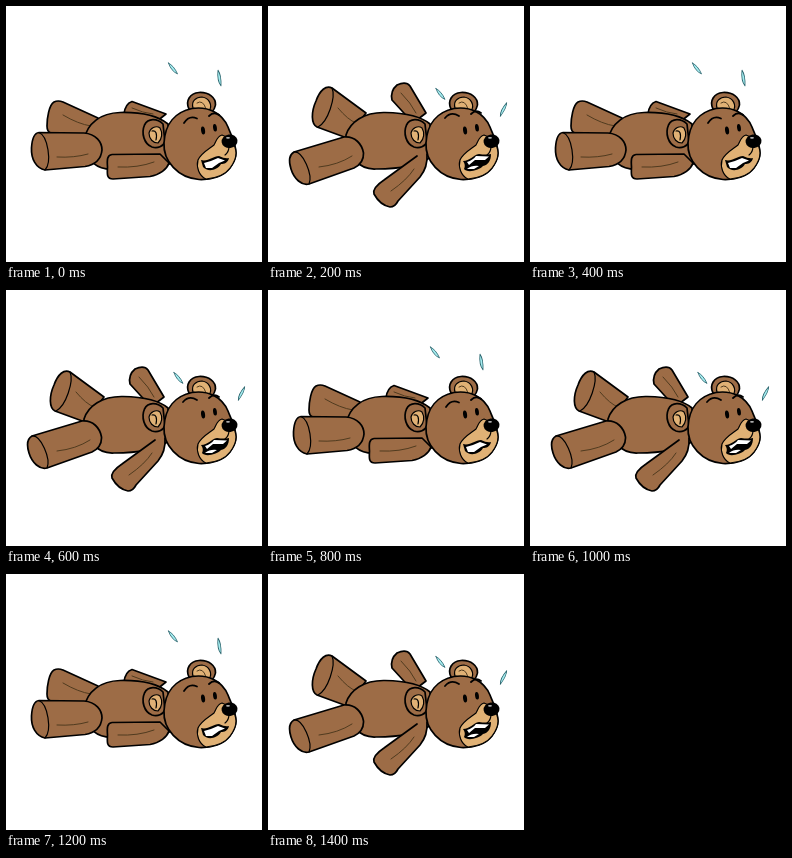
These frames come from a looping animation (256 px wide and 256 px high, 1600 ms). An HTML page:

```html
<!DOCTYPE html>
<html lang="en">
<head>
<meta charset="utf-8">
<title>Swimming bear</title>
<style>
html, body { margin: 0; width: 100%; height: 100%; overflow: hidden; background: #fff; }
svg { display: block; width: 100vw; height: 100vh; }
.fur { fill: #9d6c46; }
.tan { fill: #e0b175; stroke-width: 1.2; }
.ink { fill: #000; stroke: none; }
.teeth { fill: #fff; stroke: none; }
.line { fill: none; stroke-width: 1.2; }
.crease { fill: none; stroke: #503b1f; stroke-width: 1; }
.brow { fill: none; stroke-width: 1.8; }
.drop { fill: #a5edf0; stroke: #245f68; stroke-width: .9; }
</style>
</head>
<body>
<svg viewBox="0 0 256 256" stroke="#000" stroke-width="1.7" stroke-linejoin="round" stroke-linecap="round">
  <defs>
    <g id="head">
      <path class="fur" d="M183 103C179 95 184 87 193 86.500C203 86 210 92 209.500 99C209 103 207 105 205 107Z"/>
      <path class="tan" d="M187 102C185 95 190 91 196 91C203 92 207 99 203 105Z"/>
      <path class="crease" d="M191 97Q197 93 200 103"/>
      <path class="fur" d="M157 118C151 112 142 112 138.500 119C135 127 138 138 146 141C152 143 157 140 159 136Z"/>
      <path class="fur" d="M158 137C159 118 169 106 186 102.500C202 100 216 107 222 121C225 129 230 138 230 147C230 154 227 157 224 162C218 170 206 174 193 173.500C172 172 157 155 158 137Z"/>
      <path class="tan" d="M154 122C150 119 144 122 143 127C143 133 147 137 152 137C156 133 157 127 154 122Z"/>
      <path class="line" d="M146 125Q152 124 150 134"/>
      <path class="tan" d="M216 129C211 130 210 136 208 139C203 143 195 147 192 154C190 161 193 170 200 173C210 172 219 169 224 162C228 157 230 152 230 147C230 142 228 138 225 133Z"/>
      <path class="line" d="M223 140Q223 146 219 149"/>
      <ellipse class="ink" cx="223.500" cy="135.300" rx="8" ry="6.800" transform="rotate(-8 223 135)"/>
      <ellipse cx="222" cy="131.800" rx="2" ry=".9" fill="#bbb" stroke="none"/>
      <ellipse class="ink" cx="197" cy="124.500" rx="2" ry="4" transform="rotate(-8 197 124)"/>
      <ellipse class="ink" cx="209" cy="121.800" rx="1.900" ry="3.800" transform="rotate(-8 209 122)"/>
    </g>
    <path id="drop" class="drop" d="M-5-6Q1-3 5 6Q-2 3-5-6Z"/>
  </defs>

  <g class="pose">
    <path class="fur" d="M118 108Q119 98 126 95.500L160 108L150 116Z"/>
    <path class="crease" d="M126 102Q137 107 147 108"/>
    <path class="fur" d="M84 130L45 127Q41 126 41 120C41 112 43 99 48 96Q52 94 57 96L92 112Z"/>
    <path class="crease" d="M57 109Q72 118 85 120"/>
    <path class="fur" d="M78 134C81 117 95 107 114 106.500C135 106 152 110 162 118L164 158L110 163C92 165 78 155 78 134Z"/>
    <path class="fur" d="M33 126.500L78 127C90 128 96 136 96 144C95 154 88 159 79 160.500L39 164C30 162 25 153 25.500 142C26 133 28 127 33 126.500Z"/>
    <path class="line" d="M33 126.500C42 130 46 157 39 164"/>
    <path class="crease" d="M51 151Q68 152 82 148"/>
    <path class="fur" d="M154 148L106 148.500C101 149 101 154 101.500 161C101 169 101 173 107 173L144 170.500C154 169 161 163 163 157Z"/>
    <path class="crease" d="M112 161Q132 162 148 156"/>
    <use href="#head"/>
    <path class="brow" d="M178 117Q183 109 191 112.500M203 110Q208 105 213 109"/>
    <path class="ink" d="M195 154C202 156 207 150 213 150Q219 153 223 152C222 157 218 158 215 158C211 165 201 166 197 161Z"/>
    <path class="teeth" d="M198 157Q206 155 212 152L219 154.500L213 157L206 162L200 162Z"/>
    <use href="#drop" transform="translate(167 62.500) scale(.9)"/>
    <use href="#drop" transform="translate(213.500 72) rotate(19) scale(.8 1.150)"/>
  </g>

  <g class="pose" visibility="hidden">
    <path class="fur" d="M145 117L124 94Q122 85 129 79Q138 75 142 80L158 107Z"/>
    <path class="crease" d="M133 87Q143 97 148 107"/>
    <path class="fur" d="M79 132L49 121C43 118 43 106 48 95C52 84 58 79 64 82L98 107Z"/>
    <path class="line" d="M64 82C68 91 60 116 50 121"/>
    <path class="crease" d="M70 102Q80 114 88 117"/>
    <path class="fur" d="M78 129C82 116 96 106 117 106.500C137 107 153 110 162 118L163 151C150 160 129 163 108 163C92 164 76 149 78 129Z"/>
    <path class="fur" d="M26 146L76 131C87 130 94 138 95.500 147Q96 157 86 162L41 178C34 180 26 173 23 163Q19 150 26 146Z"/>
    <path class="line" d="M26 146C35 145 45 169 41 178"/>
    <path class="crease" d="M51 161Q70 159 84 150"/>
    <path class="fur" d="M149 150L116 174Q104 182 106 188Q112 199 122 201Q127 201 130 195L152 171Q160 161 159 148"/>
    <path class="crease" d="M123 185Q139 174 146 163"/>
    <use href="#head"/>
    <path class="brow" d="M177 112Q183 105 191 110M203 108Q208 103 213 107"/>
    <path class="ink" d="M195 155C202 155 205 149 211 148Q218 149 223 148C223 155 220 159 215 160C210 165 199 167 196 163Q198 159 195 155Z"/>
    <path class="teeth" d="M199 156Q205 154 208 150L221 150.500L217 154L207 154L201 159ZM199 163Q204 159 211 160L206 163Z"/>
    <use href="#drop" transform="translate(172.500 88) scale(.9)"/>
    <use href="#drop" transform="translate(235.500 103.500) rotate(53) scale(.7 1.100)"/>
  </g>
</svg>
<script>
const poses = document.querySelectorAll('.pose');
const start = performance.now();

function draw(now) {
  const active = Math.floor(Math.max(0, now - start) / 200) % 2;
  poses.forEach((pose, i) => pose.setAttribute('visibility', i === active ? 'visible' : 'hidden'));
  requestAnimationFrame(draw);
}
draw(start);
</script>
</body>
</html>
```
